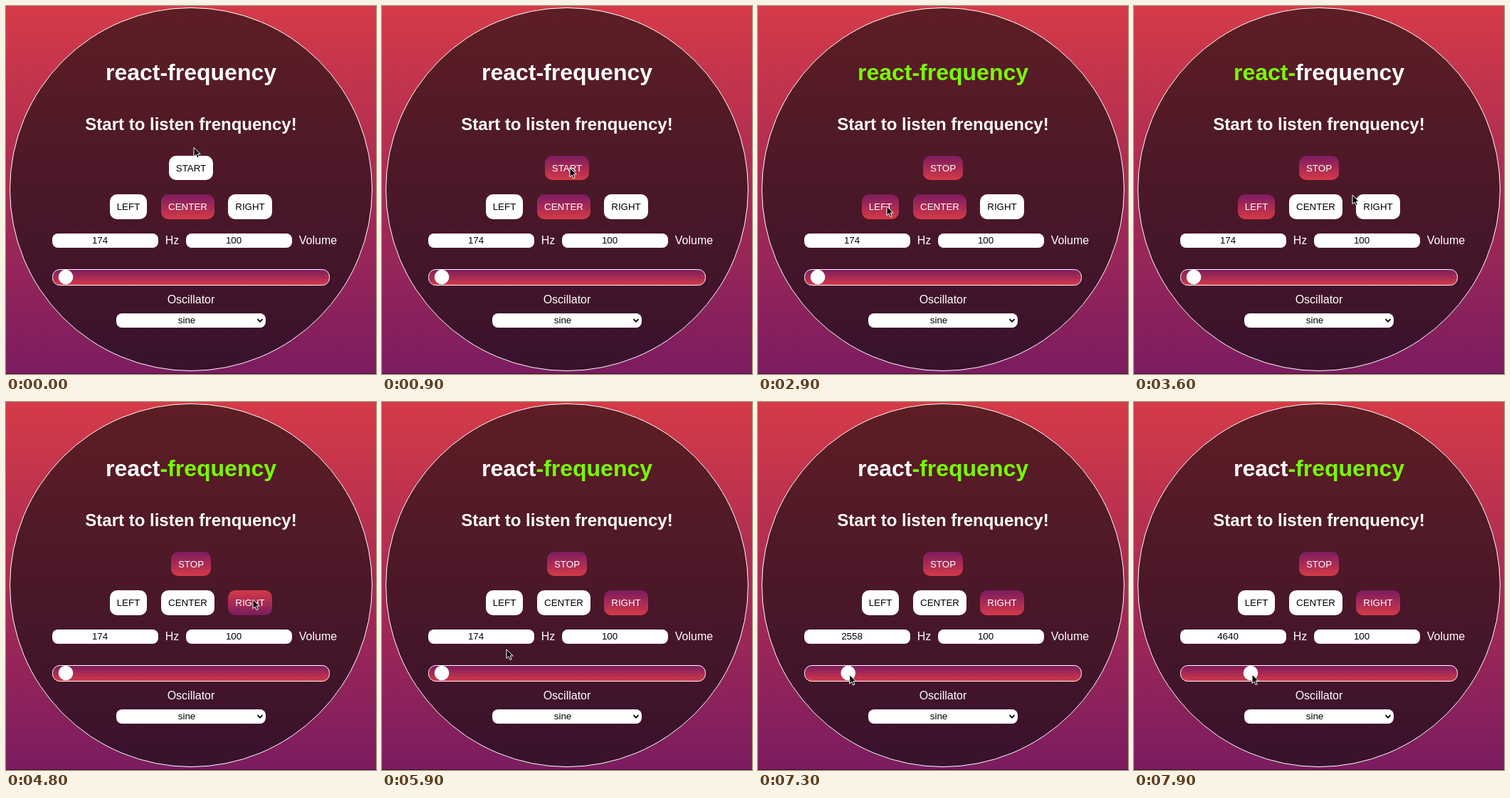
Write an HTML page that moves like this. It is 520 px wide and 516 px high and loops after 8000 ms.

```html
<!DOCTYPE html>
<html lang="en">
<head>
<meta charset="utf-8">
<title>react-frequency</title>
<style>
  html, body { margin: 0; width: 100%; height: 100%; overflow: hidden; }
  svg { display: block; width: 520px; height: 516px; }
  text { font: 13.333px "Liberation Sans", Arial, sans-serif; text-anchor: middle; }
  .light { fill: #fff; }
  .label { font-size: 16px; fill: #fff; }
  .title { font-size: 32px; font-weight: bold; }
  .heading { font-size: 24px; font-weight: bold; }
</style>
</head>
<body>
<svg viewBox="0 0 520 516">
  <defs>
    <linearGradient id="down" x2="0" y2="1">
      <stop stop-color="#d53a48"/><stop offset="1" stop-color="#7b1c60"/>
    </linearGradient>
    <linearGradient id="up" x2="0" y2="1">
      <stop stop-color="#7b1c60"/><stop offset="1" stop-color="#d53a48"/>
    </linearGradient>
  </defs>
  <rect width="520" height="516" fill="url(#down)"/>
  <rect y="515" width="520" height="1" fill="#000" opacity=".5"/>
  <circle cx="260" cy="257" r="254.5" fill="#0b0b0b" fill-opacity=".59" stroke="#fff"/>

  <text class="title" x="260" y="104"><tspan id="react">react</tspan><tspan id="dash">-</tspan><tspan id="freq">frequency</tspan></text>
  <text class="heading light" x="260" y="174">Start to listen frenquency!</text>
  <g id="buttons"></g>

  <g fill="#fff">
    <rect x="65" y="319" width="149" height="20" rx="8"/>
    <rect x="253" y="319" width="149" height="20" rx="8"/>
    <rect x="155" y="431" width="210" height="20" rx="8"/>
  </g>
  <text id="hz" x="132" y="333"></text>
  <text x="320" y="333">100</text>
  <text class="label" x="233.5" y="334">Hz</text>
  <text class="label" x="438.5" y="334">Volume</text>

  <rect x="65.5" y="369.5" width="389" height="22" rx="10" fill="url(#up)" stroke="#fff"/>
  <circle id="thumb" cy="380" r="10.3" fill="#fff"/>
  <text class="label" x="260" y="417">Oscillator</text>
  <text x="254" y="445">sine</text>
  <path d="M353.5 439l3.5 3.6 3.5-3.6" fill="none" stroke="#111" stroke-width="2"/>
  <path id="cursor" d="M0 0V12.6L3 9.9L5 14.6L7.2 13.7L5.2 9H9.2Z" fill="#000" stroke="#fff"/>
</svg>
<script>
const LOOP = 8000, START = 1100, LEFT = 3100, RIGHT = 4700;
const DRAG = [6700, 7850];
const $ = id => document.getElementById(id);

// Pointer stops: time, x, y
const stops = [
  [0, 264, 198.5], [150, 264, 198.5], [800, 264, 227], [1600, 264, 227],
  [2400, 181, 281], [3200, 181, 281], [3600, 307, 265], [4300, 347, 277],
  [5050, 347, 277], [6450, 86, 383], [DRAG[0], 86, 383], [DRAG[1], 166, 382], [LOOP, 166, 382]
];

function addButton(x, y, w) {
  const h = y < 250 ? 34 : 35;
  const make = tag => $('buttons').appendChild(document.createElementNS('http://www.w3.org/2000/svg', tag));
  const box = make('rect'), text = make('text');
  const set = (x, w) => {
    for (const [k, v] of Object.entries({ x, y, width: w, height: h, rx: 10 })) box.setAttribute(k, v);
    text.setAttribute('x', x + w / 2);
    text.setAttribute('y', y + 22);
  };
  return (label, active, p, nx = x, nw = w) => {
    set(nx, nw);
    const hover = p.x >= nx && p.x <= nx + nw && p.y >= y && p.y <= y + h;
    const lit = hover || active;
    box.setAttribute('fill', lit ? `url(#${hover && active ? 'down' : 'up'})` : '#fff');
    text.setAttribute('fill', lit ? '#fff' : '#000');
    text.textContent = label;
  };
}

const power = addButton(229, 210, 62);
const left = addButton(146, 264, 52);
const center = addButton(218, 264, 75);
const right = addButton(312, 264, 62);

const clamp = v => Math.max(0, Math.min(1, v));
const ease = v => v * v * (3 - 2 * v);

function pointer(t) {
  const i = stops.findIndex(s => s[0] > t);
  const [t0, x0, y0] = stops[i - 1], [t1, x1, y1] = stops[i];
  const k = ease((t - t0) / (t1 - t0));
  return { x: x0 + (x1 - x0) * k, y: y0 + (y1 - y0) * k };
}

function draw(t) {
  const p = pointer(t), on = t >= START;
  const side = t < LEFT ? 'center' : t < RIGHT ? 'left' : 'right';
  const paint = (id, green) => $(id).setAttribute('fill', green ? '#76ff03' : '#fff');
  paint('react', on && side !== 'right');
  paint('dash', on);
  paint('freq', on && side !== 'left');

  if (on) power('STOP', true, p, 232, 56);
  else power('START', false, p);
  left('LEFT', side === 'left', p);
  center('CENTER', side === 'center', p);
  right('RIGHT', side === 'right', p);

  const slide = ease(clamp((t - DRAG[0]) / (DRAG[1] - DRAG[0])));
  $('thumb').setAttribute('cx', 84 + 80 * slide);
  $('hz').textContent = Math.round(174 + 4466 * slide);
  $('cursor').setAttribute('transform', `translate(${p.x} ${p.y})`);
}

const begin = performance.now();
function tick() {
  draw((performance.now() - begin) % LOOP);
  requestAnimationFrame(tick);
}
tick();
</script>
</body>
</html>
```
